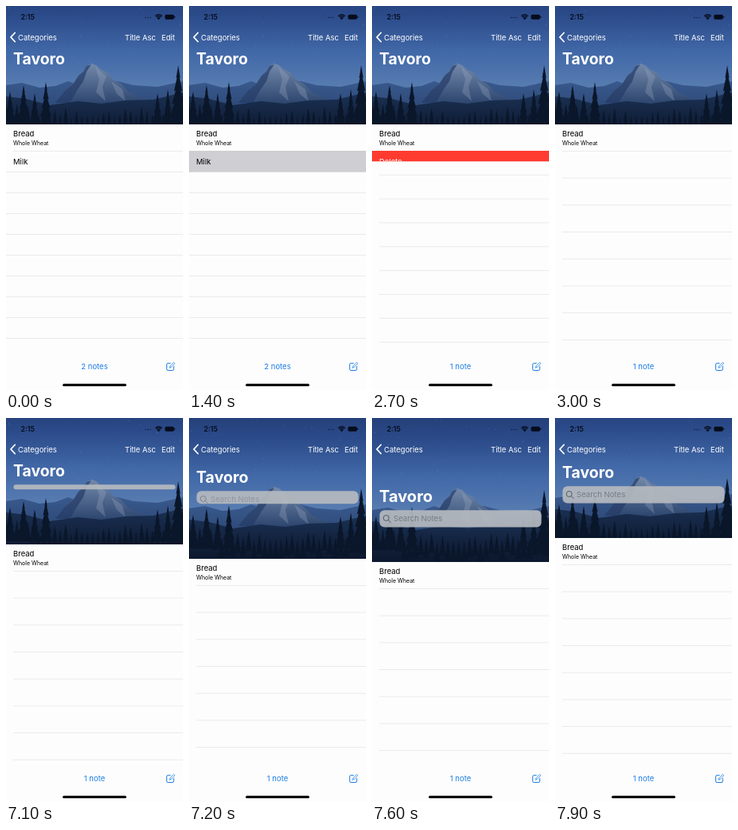
An HTML page for the animation above (8 s loop, 222 by 480 pixels).

```html
<!DOCTYPE html>
<html lang="en">
<head>
<meta charset="utf-8">
<title>Notes list</title>
<style>
  html, body { margin: 0; width: 100%; height: 100%; overflow: hidden; background: #fdfdfd; }
  svg { display: block; }
  text { font-family: Inter, Roboto, "Liberation Sans", sans-serif; font-size: 9.5px; }
</style>
</head>
<body>
<svg id="stage" width="222" height="480" viewBox="0 0 222 480">
  <defs>
    <linearGradient id="sky" x1="0" y1="0" x2="0" y2="1">
      <stop offset="0" stop-color="#203a70"/>
      <stop offset=".3" stop-color="#2b4a89"/>
      <stop offset=".62" stop-color="#4269a8"/>
      <stop offset="1" stop-color="#5f83b4"/>
    </linearGradient>
    <linearGradient id="haze" x1="0" y1="0" x2="0" y2="1">
      <stop offset="0" stop-color="#39598d"/>
      <stop offset="1" stop-color="#1a2f55"/>
    </linearGradient>
    <linearGradient id="rock" x1="0" y1="0" x2="0" y2="1">
      <stop offset="0" stop-color="#7389ab"/>
      <stop offset="1" stop-color="#2b446d"/>
    </linearGradient>
    <linearGradient id="wood" x1="0" y1="0" x2="0" y2="1">
      <stop offset="0" stop-color="#1b3154"/>
      <stop offset=".6" stop-color="#0d1a31"/>
      <stop offset="1" stop-color="#091222"/>
    </linearGradient>
  </defs>

  <g id="photo">
    <rect y="-34" width="222" height="150" fill="url(#sky)"/>
    <g id="stars" fill="#a9c1ea"/>
    <path d="M0 99L20 96 42 102 62 100 78 94 92 99 140 94 160 99 190 101 222 94V185H0Z" fill="url(#haze)"/>
    <path d="M62 121L74 106 84 98 91 87 97 82 101 75 107 72 113 74 120 80 127 83 134 92 144 97 154 108 168 114 176 123Z" fill="url(#rock)"/>
    <path d="M107 73L101 82 97 94 90 104 80 121H62L74 106 84 98 91 87 97 82 101 75Z" fill="#243d68" opacity=".7"/>
    <path d="M112 76L117 92 113 108 125 119 121 101 126 88ZM132 94L139 110 150 119 146 104Z" fill="#a0afc5" opacity=".28"/>
    <path d="M0 113L25 116 55 124 90 119 120 122 150 118 185 117 222 108V190H0Z" fill="url(#wood)"/>
    <g id="trees" fill="#0a1629"/>
  </g>

  <g id="heading" fill="#fff">
    <text id="title" x="0" y="0" style="font-size:19.4px;font-weight:700">Tavoro</text>
  </g>
  <g id="search">
    <rect id="field" x="9.5" width="203" fill="#b6babf" opacity=".92"/>
    <g id="prompt">
      <circle cx="17.8" cy="9.8" r="3.5" fill="none" stroke="#555a61"/>
      <path d="M20.4 12.4L23.3 15.3" stroke="#555a61" stroke-linecap="round"/>
      <text x="27" y="14.1" fill="#777c83" style="font-size:9.6px">Search Notes</text>
    </g>
  </g>

  <g fill="#060c1b">
    <text x="18.5" y="17.2" style="font-size:8.8px;font-weight:600">2:15</text>
    <g opacity=".65"><circle cx="175" cy="14.5" r=".8"/><circle cx="178" cy="14.5" r=".8"/><circle cx="181" cy="14.5" r=".8"/></g>
    <path d="M191.5 17.2L189.4 14.9Q191.5 13.2 193.6 14.9Z"/>
    <path d="M187.1 12.6Q191.5 8.8 195.9 12.6M188.4 14Q191.5 11.4 194.6 14" fill="none" stroke="#060c1b" stroke-width="1.2"/>
    <rect x="199.4" y="10.8" width="11.4" height="6" rx="1.8"/>
    <rect x="211.2" y="12.8" width="1" height="2" rx=".5"/>
  </g>
  <g fill="#fff">
    <path d="M11.2 33.5L6 39 11.2 44.5" fill="none" stroke="#fff" stroke-width="1.8" stroke-linecap="round" stroke-linejoin="round"/>
    <text x="15" y="42.5">Categories</text>
    <text x="149" y="42.5">Title Asc</text>
    <text x="195" y="42.5">Edit</text>
  </g>

  <g id="list">
    <rect y="148" width="222" height="340" fill="#fdfdfd"/>
    <text x="9" y="163" fill="#000">Bread</text>
    <text x="9" y="173.6" fill="#000" style="font-size:7px">Whole Wheat</text>
    <g id="lines" stroke="#e2e2e4" stroke-width=".7"/>
    <rect id="highlight" y="181" width="222" height="26.5" fill="#cfced3"/>
    <text id="milk" y="198.3" fill="#000">Milk</text>
    <svg id="action" x="0" y="181" width="222" height="26.5" overflow="hidden">
      <rect id="red" width="222" height="27" fill="#ff3b30"/>
      <text id="delete" y="17.2" fill="#fff">Delete</text>
    </svg>
  </g>

  <rect y="431" width="222" height="49" fill="#fdfdfd"/>
  <text id="count" x="111" y="454" fill="#1b7de6" text-anchor="middle"></text>
  <g fill="none" stroke="#1b7de6" stroke-linecap="round" stroke-linejoin="round">
    <path d="M206.2 446.6H203.2Q201.6 446.6 201.6 448.2V453.9Q201.6 455.5 203.2 455.5H208.8Q210.4 455.5 210.4 453.9V450.6"/>
    <path d="M205.2 452L206 449.8 210.4 445.4 211.8 446.8 207.4 451.2Z" stroke-width=".8"/>
  </g>
  <rect x="71" y="472.2" width="80" height="3" rx="1.5" fill="#000"/>
</svg>
<script>
const $ = id => document.getElementById(id);
const LOOP = 8000, STEP = 100, ROW = 26, TALL_ROW = 33.7, FIRST_LINE = 181.4;

function add(parent, tag, attrs) {
  const el = document.createElementNS("http://www.w3.org/2000/svg", tag);
  return parent.appendChild(set(el, attrs));
}
function set(el, attrs) {
  for (const key in attrs) el.setAttribute(key, attrs[key]);
  return el;
}
const mix = (a, b, p) => a + (b - a) * p;

// Linear interpolation through [time, value] pairs
function track(t, ...keys) {
  if (t <= keys[0][0]) return keys[0][1];
  for (let i = 1; i < keys.length; i++) {
    const [t0, a] = keys[i - 1], [t1, b] = keys[i];
    if (t <= t1) return mix(a, b, (t - t0) / (t1 - t0));
  }
  return keys[keys.length - 1][1];
}

let seed = 11;
const random = () => (seed = (seed * 16807) % 2147483647) / 2147483647;
for (let i = 0; i < 90; i++)
  add($("stars"), "circle", {
    cx: random() * 222, cy: -32 + random() * 105,
    r: 0.2 + random() * 0.3, opacity: 0.2 + random() * 0.4
  });

function tree(x, top, bottom, half) {
  const tiers = 5;
  let left = "", right = "";
  for (let i = 1; i <= tiers; i++) {
    const y = mix(top, bottom, i / tiers), w = half * i / tiers;
    right += `L${x + w} ${y}L${x + w * 0.6} ${y - 1}`;
    left = `L${x - w * 0.6} ${y - 1}L${x - w} ${y}` + left;
  }
  add($("trees"), "path", { d: `M${x} ${top}${right}${left}Z` });
}
for (let i = 0; i < 34; i++) {
  const x = i * 6.8, top = 121 + random() * 12 + 7 * Math.sin(x / 222 * Math.PI);
  tree(x, top, top + 26, 4.5);
}
tree(22, 99, 150, 9);
tree(50, 95, 150, 9);
tree(36, 109, 150, 7);
tree(5, 107, 150, 8);
tree(190, 109, 150, 7);
tree(216, 74, 155, 13);
tree(203, 104, 150, 7);

const lines = Array.from({ length: 11 }, () => add($("lines"), "line", { x2: 222 }));

function render(t) {
  const deleted = t >= 2500;

  // Swipe to delete, then collapse the row
  const swipe = track(t, [1500, 0], [1600, 6], [1800, 34], [2200, 101], [2300, 150], [2400, 205], [2500, 222]);
  const shrink = track(t, [2500, 0], [2600, .2], [2700, .5], [2800, .8], [2900, .95], [3000, 1]);
  const edge = 222 - swipe;
  set($("highlight"), { visibility: t >= 1400 && t < 1600 ? "visible" : "hidden" });
  set($("milk"), { x: 9 - swipe, visibility: deleted ? "hidden" : "visible" });
  set($("action"), { height: 26.5 * (1 - shrink), visibility: swipe && shrink < 1 ? "visible" : "hidden" });
  set($("red"), { x: edge });
  set($("delete"), { x: edge + track(t, [2200, 74], [2400, 9]) });
  $("count").textContent = deleted ? "1 note" : "2 notes";
  lines.forEach((line, i) => {
    const y = FIRST_LINE + i * mix(ROW, TALL_ROW, shrink);
    set(line, { x1: i && !deleted ? 0 : 9, y1: y, y2: y });
  });

  // Pull down to reveal the search field, then bounce back
  const pull = track(t, [7000, 0], [7100, 10], [7200, 28], [7300, 45], [7400, 56],
    [7500, 50], [7600, 32], [7700, 16], [7800, 6], [7900, 2]);
  const drop = t < 7400 ? track(t, [7100, 0], [7200, 8], [7300, 32], [7400, 56]) : pull;
  const height = track(t, [7000, 0], [7100, 6], [7200, 16], [7300, 21.3]);
  set($("photo"), { transform: `translate(0 ${pull / 2})` });
  set($("list"), { transform: `translate(0 ${pull})` });
  set($("heading"), { transform: `translate(9 ${73 + drop}) scale(${1 + drop * 0.00107})` });
  set($("search"), { transform: `translate(0 ${83.2 + drop})`, visibility: height ? "visible" : "hidden" });
  set($("field"), { height, rx: Math.min(6, height / 2) });
  set($("prompt"), { opacity: track(height, [10, 0], [21, 1]) });
}

function frame() {
  const t = performance.now() % LOOP;
  render(Math.floor(t / STEP) * STEP);
  requestAnimationFrame(frame);
}
frame();
</script>
</body>
</html>
```
